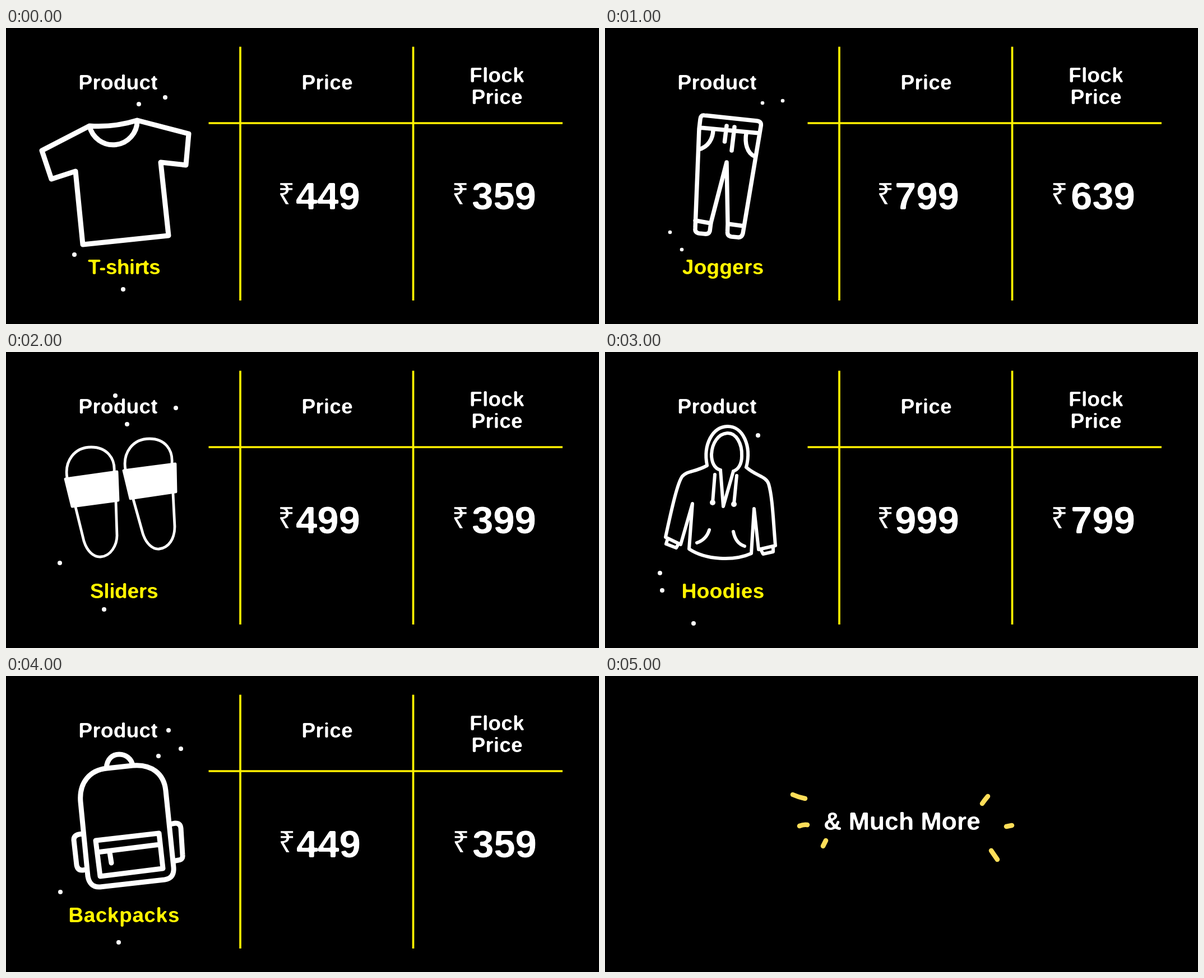
Write an HTML page that moves like this. It is 1058 px wide and 529 px high and loops after 6000 ms.

```html
<!DOCTYPE html>
<html lang="en">
<head>
<meta charset="utf-8">
<title>Price list</title>
<style>
  html, body { margin: 0; height: 100%; overflow: hidden; background: #000; }
  svg { display: block; width: 100%; height: 100%; }
  text { font: bold 37.5px "Liberation Sans", Arial, sans-serif; fill: #fff; text-anchor: middle; }
  .label { fill: #fff200; }
  .price { font-size: 69px; text-anchor: end; }
  .rupee { font: 53px "Noto Sans", "DejaVu Sans", sans-serif; text-anchor: start; }
  .more { font-size: 45px; letter-spacing: -.25px; }
  .grid { stroke: #fff200; stroke-width: 3.7; }
  .icon, .burst { fill: none; stroke: #fff; stroke-linecap: round; stroke-linejoin: round; }
  .burst { stroke: #ffde59; stroke-width: 8.5; }
  .solid, circle { fill: #fff; }
</style>
</head>
<body>
<svg viewBox="0 0 1058 529">
  <defs>
    <!-- softens the corners of the lettering -->
    <filter id="round" x="0" y="0" width="1058" height="529" filterUnits="userSpaceOnUse" color-interpolation-filters="sRGB">
      <feGaussianBlur stdDeviation="1.1"/>
      <feComponentTransfer><feFuncA type="linear" slope="3.6" intercept="-1.3"/></feComponentTransfer>
    </filter>
  </defs>
  <g id="table">
    <path class="grid" d="M418 33.5V487M726.5 33.5V487M361.5 170H993"/>
    <g filter="url(#round)">
      <text x="200" y="109.5">Product</text>
      <text x="573" y="109.5">Price</text>
      <text x="876" y="96.5">Flock</text>
      <text x="876" y="136">Price</text>
    </g>
  </g>
</svg>
<script>
const LOOP = 6000, COUNT = 6;
const svg = document.querySelector('svg');

const products = [
  {
    name: 'T-shirts', prices: [449, 359], spacing: -.8, width: 9, r: 4,
    dots: [[237, 136], [284, 124], [122, 405], [209, 467]],
    path: `M149 175L64 219L81 270L124 256L137 387L290 371L276 240L321 245L326 189L234 165
      Q192 178 149 175A43 43 0 0 0 234 165`
  },
  {
    name: 'Joggers', prices: [799, 639], width: 7.5, r: 3.3,
    dots: [[281, 134], [317, 130], [116, 365], [137, 396]],
    path: `M177 156L271 166Q280 167 278 176L246 367Q244 375 237 374L226 373Q218 372 218.500 364
      L219 350L217 240L189 348L187 363Q185 369 178 368L168 367Q160 366 161 358L168 180L170 163Q171 155 177 156Z
      M169 178L276 188M161 344L189 349M219 350L248 354
      M193 181C193 198 184 213 167 217M252 188C249 205 253 224 268 230
      M217 175L213.500 203M231 177L226 219`
  },
  {
    name: 'Sliders', prices: [499, 399], spacing: -.5, width: 4.8, r: 4,
    dots: [[195, 78], [303, 100], [216, 129], [96, 377], [175, 460]],
    path: `M109 225C104 195 122 170 152 170C180 170 195 190 193 214
      M124 277L139 338C145 357 157 367 169 366C187 365 198 345 198 328L196 267
      M213 210C208 180 226 155 256 155C284 155 298 175 296 199
      M227 263L244 324C250 343 262 353 273 352C291 350 301 333 301 312L298 253`,
    solid: 'M106 227L198 214L200 265L118 276ZM210 212L302 200L303 250L222 262Z'
  },
  {
    name: 'Hoodies', prices: [999, 799], width: 6, r: 4,
    dots: [[273, 149], [98, 395], [102, 426], [158, 485], [192, 269, 5], [230, 272, 5]],
    path: `M182 202C175 165 192 134 218 133C246 132 262 168 252 206
      M206 211C194 208 190 195 190 183C191 163 202 146 218 145C234 144 245 164 244 186C244 200 238 210 229 213
      M206 211L211 276L229 213
      M182 203C160 215 147 212 138 222C130 232 120 275 108 331L135 344L156 271L150 352
      C180 372 230 374 261 360L266 280L274 353L304 346C300 300 299 260 292 236C288 222 270 222 252 206
      M112 333L109 343L127 350L131 343M278 353L282 361L300 357L300 348
      M196 219L192 269M235 221L230 272M186 318Q181 335 164 341M229 321Q233 342 249 347`
  },
  {
    name: 'Backpacks', prices: [449, 359], spacing: .3, shift: 1, width: 9, r: 4,
    dots: [[290, 97], [312, 130], [272, 143], [97, 386], [201, 476]],
    path: `M179 165C180 148 190 140 202 140C214 140 224 148 226 160
      M146 358L133 225C130 190 150 168 180 165L226 160C260 157 282 175 285 205L299 342
      C300 355 295 362 283 364L168 377C155 378 148 370 146 358Z
      M136 282L130 283Q121 285 121 293L126 338Q128 348 137 347L143 346
      M292 265L302 263Q311 263 312 272L315 320Q316 328 308 329L298 331
      M160 294L273 281L280 344L168 358ZM163 315L275 301M185 315L188 334`
  }
];

function addGroup(markup) {
  const g = document.createElementNS(svg.namespaceURI, 'g');
  g.innerHTML = markup;
  svg.append(g);
  return g;
}

function productMarkup({ name, prices, spacing = 0, shift = 0, width, r, dots, path, solid = '' }) {
  const circles = dots.map(([x, y, size = r]) => `<circle cx="${x}" cy="${y}" r="${size}"/>`).join('');
  const rupees = [485, 795.5].map(x => `<text class="rupee" x="${x + shift}" y="314.5">₹</text>`).join('');
  const amounts = prices.map((p, i) =>
    `<text class="price" x="${[632, 946][i] + shift}" y="324">${p}</text>`).join('');
  return `<g class="icon" stroke-width="${width}"><path d="${path}"/><path class="solid" d="${solid}"/></g>
    ${circles}${rupees}
    <g filter="url(#round)">${amounts}
      <text class="label" x="210.5" y="440" letter-spacing="${spacing}">${name}</text></g>`;
}

// Visible from one slot up to another, with hard cuts.
// The tiny lead keeps each cut on time despite rounding in later loops.
function show(el, from, to) {
  const LEAD = 1e-6;
  const frames = Array.from({ length: COUNT + 1 }, (_, i) => ({
    opacity: i % COUNT >= from && i % COUNT < to ? 1 : 0,
    offset: i % COUNT ? i / COUNT - LEAD : i / COUNT,
    easing: 'step-end'
  }));
  el.animate(frames, { duration: LOOP, iterations: Infinity });
}

const scenes = products.map(p => addGroup(productMarkup(p)));
scenes.push(addGroup(`
  <path class="burst" d="M335 212Q346 217 357 219M347 268Q354 265 361 266M394 294L389 304
    M683 215Q677 222 673 228M716 269L726 267M689 312L700 328"/>
  <text class="more" x="530" y="275" filter="url(#round)">&amp; Much More</text>`));

show(document.getElementById('table'), 0, products.length);
scenes.forEach((scene, i) => show(scene, i, i + 1));
</script>
</body>
</html>
```
